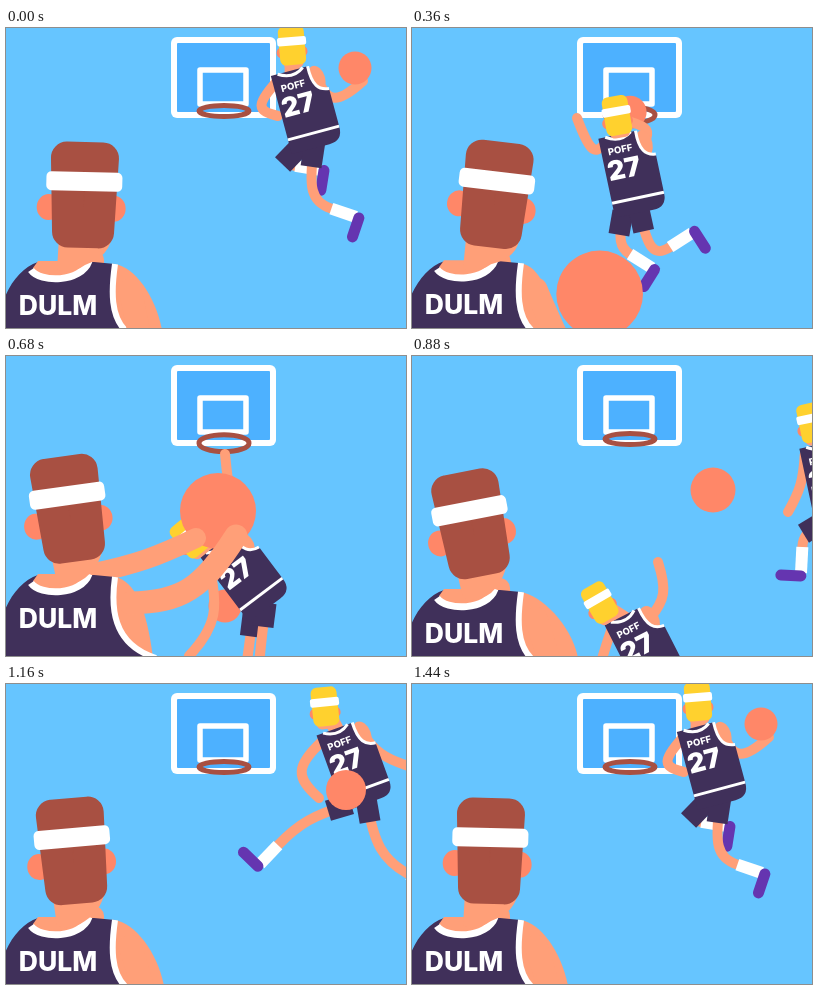
Recreate the animation shown at these times as an HTML page with a canvas. Size 400 by 300 pixels, loop 1.48 s.

```html
<!DOCTYPE html>
<html>
<head>
<meta charset="utf-8">
<style>
html, body { margin: 0; height: 100%; overflow: hidden; background: #66c5ff; }
canvas { display: block; }
</style>
</head>
<body>
<canvas id="stage" width="400" height="300"></canvas>
<script>
const ctx = document.getElementById('stage').getContext('2d');
const SKIN = '#ff9f78', BALL = '#ff8768', NAVY = '#40305a', BROWN = '#a85042',
      GOLD = '#ffd12e', PURPLE = '#6535b0', WHITE = '#fff';
const PERIOD = 1440, STEP = 40, STEPS = 37;

// Tracks: rows of [time, ...values]
const dunker = {
  body: [[-560, 413, 122, -12], [-280, 340, 77, -20], [0, 292, 76, -15], [240, 205, 102, 0],
    [360, 212, 140, -12], [520, 234, 216, -33], [680, 230, 217, -37], [880, 225, 291, -27]],
  head: [[-560, 400, 67, -12], [-280, 319, 23, -6], [0, 286, 18, -5], [240, 215, 45, 1],
    [360, 205, 88, -10], [520, 196, 176, -33], [680, 184, 182, -40], [880, 188, 247, -30]],
  armL: [[-560, 391, 130, 376, 156], [-280, 283, 88, 313, 114], [0, 245, 82, 272, 88], [240, 182, 45, 240, 24],
    [360, 180, 130, 165, 90], [520, 175, 268, 146, 217], [680, 217, 264, 183, 300], [880, 192, 295, 185, 320]],
  armR: [[-560, 430, 140, 415, 160], [-280, 372, 72, 402, 82], [0, 325, 82, 357, 53], [240, 266, 58, 262, 20],
    [360, 240, 100, 219, 94], [520, 230, 170, 219, 97], [680, 224, 150, 219, 98], [880, 257, 240, 246, 206]],
  legL: [[-560, 391, 178, 389, 217], [-280, 298, 134, 254, 180], [0, 277, 136, 315, 142], [240, 182, 190, 213, 217],
    [360, 205, 218, 240, 240], [520, 266, 300, 313, 301], [680, 242, 300, 235, 335], [880, 240, 370, 240, 410]],
  legR: [[-560, 430, 190, 440, 220], [-280, 370, 172, 425, 203], [0, 300, 172, 350, 189], [240, 214, 205, 253, 171],
    [360, 238, 232, 280, 205], [520, 286, 298, 322, 261], [680, 252, 310, 262, 340], [880, 255, 370, 262, 410]]
};
const ballTrack = [[-1300, 215, 370, 46], [-1200, 205, 313, 45], [-1060, 185, 262, 43], [-920, 170, 271, 40],
  [-760, 212, 155, 38], [-560, 301, 134, 22.5], [-440, 352, 132, 21], [-280, 340, 106, 20], [0, 349, 40, 16.5],
  [240, 254, 15, 16.5], [340, 220, 75, 16.5], [520, 220, 150, 16.5], [680, 219, 250, 16.5], [780, 219, 340, 16.5]];
const passer = {
  head: [[0, 78, 167, 1.5], [240, 83, 167, 7], [520, 80, 164, 3.5], [680, 63, 153, -8],
    [880, 60, 168, -11], [1160, 67, 167, -5], [1440, 78, 167, 1.5]],
  // lift, shoulder edge, armhole end
  body: [[0, 0, 156, 119], [240, 0, 147, 119], [520, -4, 142, 124], [680, -15, 147, 150],
    [880, 0, 166, 119], [1160, 0, 158, 119], [1440, 0, 156, 119]],
  near: [[0, 135, 310, 138, 345], [240, 135, 310, 138, 345], [520, 188, 360, 195, 268],
    [680, 188, 246, 230, 180], [880, 140, 310, 142, 345]],
  far: [[240, 90, 290, 90, 330], [520, 125, 300, 150, 295], [680, 140, 206, 190, 182], [880, 90, 290, 90, 330]]
};
const rimTrack = [[280, 0], [360, 4], [700, 4], [780, 0]];

// Smooth Hermite interpolation through a track, held at both ends
function at(track, t) {
  const last = track.length - 1;
  if (t <= track[0][0]) return track[0].slice(1);
  if (t >= track[last][0]) return track[last].slice(1);
  const i = track.findIndex(row => row[0] > t) - 1;
  const a = track[i], b = track[i + 1], span = b[0] - a[0], u = (t - a[0]) / span;
  const slope = (k, c) => {
    const p = track[Math.max(k - 1, 0)], n = track[Math.min(k + 1, last)];
    return (n[c] - p[c]) / (n[0] - p[0]) * span;
  };
  return a.slice(1).map((v, k) => {
    const c = k + 1, d = b[c] - v, m = slope(i, c), n = slope(i + 1, c);
    return v + u * (m + u * (3 * d - 2 * m - n + u * (m + n - 2 * d)));
  });
}

function fill(path, color) {
  ctx.fillStyle = color;
  ctx.fill(new Path2D(path));
}
function stroke(path, color, width, cap = 'butt') {
  ctx.strokeStyle = color;
  ctx.lineWidth = width;
  ctx.lineCap = cap;
  ctx.lineJoin = 'round';
  ctx.stroke(new Path2D(path));
}
function oval(x, y, rx, ry, color) {
  ctx.fillStyle = color;
  ctx.beginPath();
  ctx.ellipse(x, y, rx, ry, 0, 0, 7);
  ctx.fill();
}
function box(x, y, w, h, r, color) {
  ctx.fillStyle = color;
  ctx.beginPath();
  ctx.roundRect(x, y, w, h, r);
  ctx.fill();
}
function label(text, x, y, size, weight = 800) {
  ctx.fillStyle = WHITE;
  ctx.font = `${weight} ${size}px Inter, sans-serif`;
  ctx.textAlign = 'center';
  ctx.fillText(text, x, y);
}
function posed([x, y, deg], draw) {
  ctx.save();
  ctx.translate(x, y);
  ctx.rotate(deg * Math.PI / 180);
  draw();
  ctx.restore();
}
function place([x, y, deg], px, py) {
  const a = deg * Math.PI / 180, c = Math.cos(a), s = Math.sin(a);
  return [x + px * c - py * s, y + px * s + py * c];
}
const toward = (a, b, d) => {
  const len = Math.hypot(b[0] - a[0], b[1] - a[1]) || 1;
  return [a[0] + (b[0] - a[0]) / len * d, a[1] + (b[1] - a[1]) / len * d];
};
function limb(from, bend, to, width) {
  const pull = p => p.map((v, i) => v + (bend[i] - v) * .8);
  stroke(`M${from} C${pull(from)} ${pull(to)} ${to}`, SKIN, width, 'round');
}

function drawLeg(hip, [kx, ky, ax, ay]) {
  const knee = [kx, ky], ankle = [ax, ay], sock = toward(ankle, knee, 26);
  limb(hip, knee, sock, 10);
  stroke(`M${sock} L${ankle}`, WHITE, 12);
  const heel = toward(ankle, knee, -3), shin = toward([0, 0], [ax - kx, ay - ky], 20);
  stroke(`M${heel} l${-shin[1]} ${shin[0]}`, PURPLE, 11, 'round');
  stroke(`M${hip} L${toward(hip, knee, 24)}`, NAVY, 21);
}

function drawDunker(t) {
  if (t < -760 || t > 1080) return;
  const body = at(dunker.body, t), head = at(dunker.head, t);
  const armL = at(dunker.armL, t), armR = at(dunker.armR, t);
  ctx.save();
  ctx.translate(Math.max(0, -560 - t) * .4, Math.max(0, t - 880) * .9);
  limb(place(body, -15, -27), armL.slice(0, 2), armL.slice(2), 10);
  limb(place(body, 25, -20), armR.slice(0, 2), armR.slice(2), 10);
  drawLeg(place(body, -10, 42), at(dunker.legL, t));
  drawLeg(place(body, 6, 42), at(dunker.legR, t));
  stroke(`M${place(body, 2, -30)} L${head.slice(0, 2)}`, SKIN, 15);
  posed(body, () => {
    oval(24, -19, 9, 14, SKIN);
    fill('M-19-34H18C18-14 24-8 34-6V33Q34 47 20 47H-19Z', NAVY);
    stroke('M19-34C18-14 24-8 34-7', WHITE, 3);
    stroke('M-12-34Q2-25 14-34', WHITE, 3);
    stroke('M-19 32H34', WHITE, 3);
    label('POFF', 0, -15.5, 9.5);
    label('27', 0, 10, 27, 900);
  });
  posed(head, () => {
    oval(-12, 6, 4, 5, BALL);
    oval(11, 6, 4, 5, BALL);
    box(-10, 8, 20, 14, 5, SKIN);
    box(-13, -20, 26, 39, 6, GOLD);
    box(-14.5, -9, 29, 8.5, 2, WHITE);
  });
  ctx.restore();
}

function drawBall(t) {
  if (t < -1300 || t > 780) return;
  const [x, y, r] = at(ballTrack, t);
  oval(x, y, r, r, BALL);
}

function drawHoop(t) {
  const [drop] = at(rimTrack, t);
  box(165, 9, 105, 81, 6, WHITE);
  box(171, 15, 93, 69, 1, '#4db1ff');
  stroke('M194 42H240V76H194Z', WHITE, 5.5);
  ctx.strokeStyle = BROWN;
  ctx.lineWidth = 5;
  ctx.beginPath();
  ctx.ellipse(218, 83 + drop, 25, 5.5 + drop * .7, 0, 0, 7);
  ctx.stroke();
}

function drawPasser(t) {
  const head = at(passer.head, t), [lift, edge, hem] = at(passer.body, t);
  const near = at(passer.near, t), far = at(passer.far, t), top = 236 + lift;
  limb([88, 232 + lift], far.slice(0, 2), far.slice(2), 20);
  fill(`M108 ${top}C130 ${top + 3} ${edge - 6} ${top + 34} ${edge} 302H108Z`, SKIN);
  const hole = `M109 ${top}C105 ${top + 28} 105 288 ${hem} 302`;
  fill(`M-5 305V${top + 45}C0 ${top + 24} 14 ${top + 4} 32 ${top - 2}H88L109 ${top}` + hole.slice(hole.indexOf('C')) + 'Z', NAVY);
  stroke(hole, WHITE, 6);
  limb([124, 262 + lift], near.slice(0, 2), near.slice(2), 23);

  const [ax, ay] = place(head, -24, 45), [bx, by] = place(head, 29, 38);
  ctx.save();
  ctx.translate(0, lift);
  fill('M27 240C34 254 74 255 82 233H32Z', SKIN);
  stroke('M25 242C34 255 75 255 83 233', WHITE, 7);
  label('DULM', 52, 287, 26.5);
  ctx.restore();
  fill(`M51 ${top + 6}L${ax} ${ay}L${bx} ${by}Q${bx - 1} ${by + 22} 79 ${top + 1}Q65 ${top + 11} 51 ${top + 6}Z`, SKIN);
  posed(head, () => {
    oval(-35, 13, 12, 13, BALL);
    oval(30, 13, 12, 13, BALL);
    const hair = 'M-18-37H18L15 37H-15Z';
    fill(hair, BROWN);
    stroke(hair, BROWN, 32);
    box(-38, -23, 76, 19, 5, WHITE);
  });
}

function frame(now) {
  const t = Math.floor(now / STEP) % STEPS * STEP, next = t - PERIOD;
  ctx.fillStyle = '#66c5ff';
  ctx.fillRect(0, 0, 400, 300);
  drawHoop(t);
  if (t > 300) drawBall(t);
  drawDunker(t);
  drawDunker(next);
  if (t <= 300) drawBall(t);
  drawBall(next);
  drawPasser(t);
  requestAnimationFrame(frame);
}
requestAnimationFrame(frame);
</script>
</body>
</html>
```
